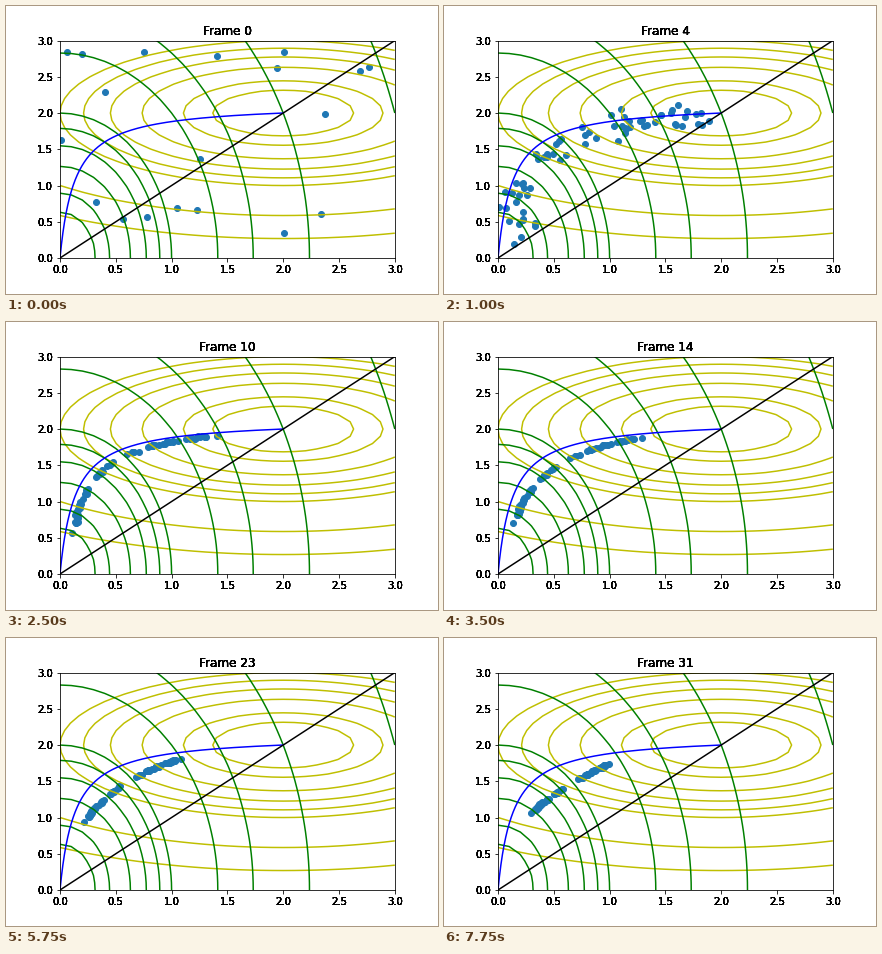
Animation of 432 by 288 pixels, one loop 8000 ms. Source, as a matplotlib script:

```python
import numpy as np
import matplotlib.pyplot as plt
from matplotlib.animation import FuncAnimation

plt.rcParams["font.family"] = "DejaVu Sans"
W, H = 432, 288
FRAMES, INTERVAL = 32, 250
LIMIT = 3.0
COUNT = 69

# Ends of the population's arc over time, and how sharply it bends.
TIMES = [2, 6, 10, 18, 23, 31]
LOW_X = [0.03, 0.09, 0.11, 0.165, 0.22, 0.30]
LOW_Y = [0.15, 0.43, 0.57, 0.84, 0.94, 1.065]
HIGH_X = [2.05, 1.64, 1.40, 1.18, 1.08, 0.995]
HIGH_Y = [2.00, 1.97, 1.91, 1.85, 1.81, 1.74]
BEND = [0.13, 0.09, 0.11, 0.38, 0.5, 1.2]

rng = np.random.default_rng(12)
first = rng.uniform(0, LIMIT, (19, 2))
order = np.sort(np.r_[0, rng.uniform(0, 1, COUNT - 2), 1])
noise = rng.normal(0, 1, (COUNT, 2))
inward = np.abs(rng.normal(0, 1, (COUNT, 1))) * [0.6, -0.6]


def arc(frame):
    """Points of a hyperbola between the two ends of the population."""
    x0, y0, x1, y1, bend = (np.interp(frame, TIMES, key)
                            for key in (LOW_X, LOW_Y, HIGH_X, HIGH_Y, BEND))
    x = np.linspace(x0, x1, 300)
    rise = x / (x + bend)
    y = y0 + (y1 - y0) * (rise - rise[0]) / (rise[-1] - rise[0])
    return x, y


def population(frame):
    if frame == 0:
        return first
    x, y = arc(frame)
    length = np.r_[0, np.cumsum(np.hypot(np.diff(x), np.diff(y)))]
    # The group slowly splits in two.
    gap = 0.18 * frame / (FRAMES - 1)
    s = (order * (1 - gap) + gap * (order > 0.55)) * length[-1]
    centre = np.column_stack([np.interp(s, length, x), np.interp(s, length, y)])
    spread = 0.28 * 0.57 ** (frame - 2)
    points = np.abs(centre + spread * (noise + inward) + 0.007 * noise)
    return points[::2] if frame == 1 else points


fig = plt.figure(figsize=(W / 72, H / 72), dpi=72, facecolor="white")
ax = fig.add_axes([0.125, 0.125, 0.775, 0.755])
ticks = np.arange(0, LIMIT + 0.1, 0.5)
ax.set(xlim=(0, LIMIT), ylim=(0, LIMIT), xticks=ticks, yticks=ticks)
ax.tick_params(labelbottom=False, labelleft=False)


def heavy_text(text, xy, offset, coords="data", **style):
    """Stack copies so that the glyph edges come out dark."""
    return [ax.annotate(text, xy, offset, xycoords=coords, textcoords="offset points",
                        annotation_clip=False, **style) for _ in range(8)]


for v in ticks:
    heavy_text(f"{v:.1f}", (v, 0), (0, -7), ha="center", va="top", fontsize=10)
    heavy_text(f"{v:.1f}", (0, v), (-7, 0), ha="right", va="center_baseline", fontsize=10)
titles = heavy_text("Frame 0", (0.5, 1), (0, 6), "axes fraction",
                    ha="center", va="baseline", fontsize=12)

# Two objectives, the set of best trade-offs and the diagonal.
grid = np.linspace(0, LIMIT, 31)
X, Y = np.meshgrid(grid, grid)
levels = [0.4, 0.8, 1.6, 2.4, 3.2, 4, 8, 12, 20, 40]
ax.contour(X, Y, (X - 2) ** 2 + 4 * (Y - 2) ** 2, levels, colors="y", linewidths=1.5, zorder=2)
ax.contour(X, Y, 4 * X ** 2 + Y ** 2, levels, colors="g", linewidths=1.5, zorder=2)
t = np.linspace(0, 1, 200)
ax.plot(2 * t / (4 - 3 * t), 8 * t / (1 + 3 * t), "b", lw=1.5)
ax.plot([0, LIMIT], [0, LIMIT], "k", lw=1.5)
dots = ax.scatter(first[:, 0], first[:, 1], s=36, color="#1f77b4", zorder=1)


def update(frame):
    dots.set_offsets(population(frame))
    for title in titles:
        title.set_text(f"Frame {frame}")
    return [dots, *titles]


anim = FuncAnimation(fig, update, frames=FRAMES, interval=INTERVAL,
                     repeat=True, repeat_delay=0, blit=False)
plt.show()
```
